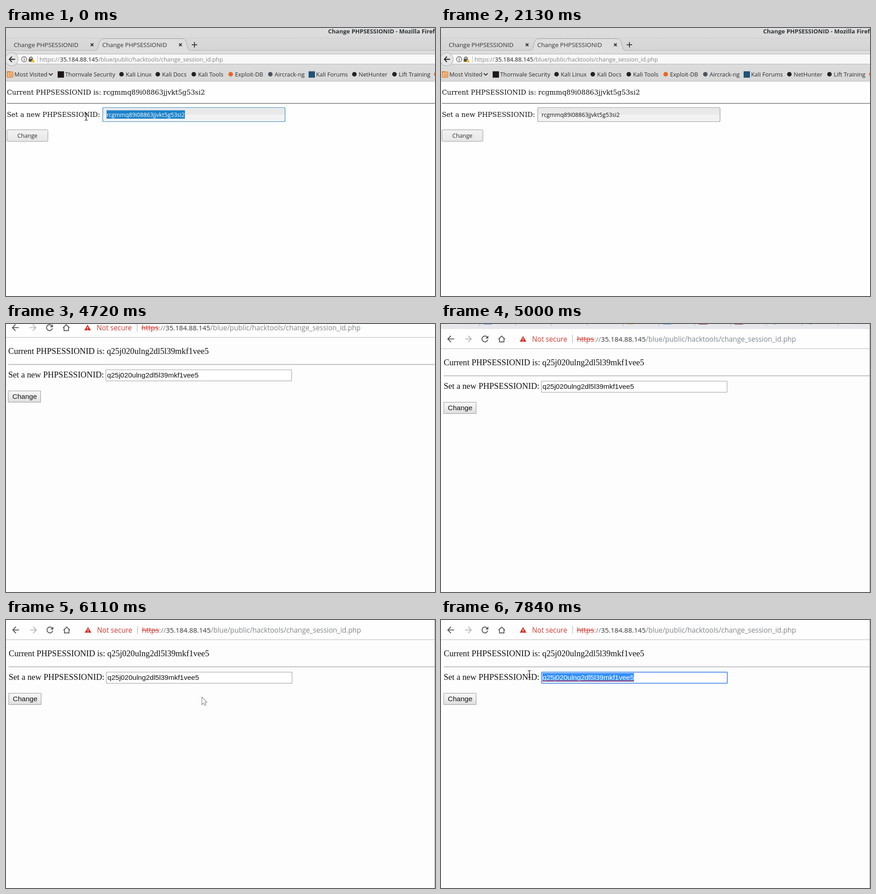
These frames come from a looping animation (947 px wide and 591 px high, 8000 ms). An HTML page with a canvas:

```html
<!DOCTYPE html>
<html lang="en">
<head>
<meta charset="utf-8">
<title>Session change</title>
<style>
html, body { margin: 0; width: 100%; height: 100%; overflow: hidden; background: #fff; }
canvas { display: block; width: 947px; height: 591px; }
</style>
</head>
<body>
<canvas id="stage" width="947" height="591"></canvas>
<script>
const ctx = document.getElementById('stage').getContext('2d');
const LOOP = 8000;
const W = 947, H = 591;
const UI = '"Open Sans", "Noto Sans", sans-serif';
const SERIF = '"DejaVu Serif", serif';
const TIMES = '"Liberation Serif", serif';
const ARIAL = '"Liberation Sans", sans-serif';
const OLD_ID = 'rcgmmq89i08863jjvkt5g53si2';
const NEW_ID = 'q25j020ulng2dl5l39mkf1vee5';
const HOST = '35.184.88.145';
const PATH = '/blue/public/hacktools/change_session_id.php';

// [time, shape, x, y]; arrows are placed by the tip, beams by the centre
const POINTER = [
  [0, 'beam', 177, 196], [150, 'beam', 186, 194], [270, 'beam', 199, 190],
  [390, 'beam', 211, 187], [540, 'arrow', 370, 96], [660, 'arrow', 495, 27],
  [810, 'arrow', 509, 24], [960, 'arrow', 440, 36], [1080, 'beam', 320, 66],
  [1200, 'beam', 246, 75], [1350, 'arrow', 372, 122], [1470, 'arrow', 480, 168],
  [1740, 'arrow', 489, 171], [1990, 'arrow', 585, 171], [2130, 'none', 0, 0],
  [5420, 'arrow', 932, 46], [5570, 'arrow', 700, 118], [5690, 'arrow', 473, 190],
  [5840, 'arrow', 390, 142], [5960, 'arrow', 311, 97], [6110, 'arrow', 432, 170],
  [6240, 'arrow', 461, 83], [6380, 'arrow', 374, 86], [6630, 'arrow', 382, 101],
  [6780, 'arrow', 402, 108], [6900, 'beam', 424, 126], [7020, 'beam', 438, 131],
  [7170, 'beam', 440, 130], [7300, 'beam', 440, 129], [7450, 'beam', 372, 125],
  [7580, 'beam', 282, 119], [7700, 'beam', 198, 115], [7840, 'beam', 195, 119]
];

// [time, x, y] of the second page while the view pans
const PAN = [[3000, -3, -56], [4720, -1, -25], [4870, 0, -10], [5000, 0, 0], [5140, 0, -11]];

// [time, left edge of the selected text]
const DRAG = [[0, 426], [7450, 372], [7580, 282], [7700, 224]];

const at = (keys, t) => keys.reduce((found, key) => key[0] <= t ? key : found, keys[0]);

function text(str, x, y, size, family, color = '#000', weight = 400) {
  ctx.font = `${weight} ${size}px ${family}`;
  ctx.fillStyle = color;
  ctx.fillText(str, x, y);
}

function box(x, y, w, h, color) {
  ctx.fillStyle = color;
  ctx.fillRect(x, y, w, h);
}

function dot(x, y, r, color) {
  ctx.fillStyle = color;
  ctx.beginPath();
  ctx.arc(x, y, r, 0, 7);
  ctx.fill();
}

function line(points, color, width = 1, close = false) {
  ctx.beginPath();
  points.forEach(([x, y]) => ctx.lineTo(x, y));
  if (close) ctx.closePath();
  ctx.strokeStyle = color;
  ctx.lineWidth = width;
  ctx.stroke();
}

function fade(y, h, ...colors) {
  const g = ctx.createLinearGradient(0, y, 0, y + h);
  colors.forEach((c, i) => g.addColorStop(i / (colors.length - 1), c));
  return g;
}

function panel(x, y, w, h, r, fill, stroke, width = 1) {
  ctx.beginPath();
  ctx.roundRect(x, y, w, h, r);
  ctx.fillStyle = fill;
  ctx.fill();
  ctx.strokeStyle = stroke;
  ctx.lineWidth = width;
  ctx.stroke();
}

function drawPointer(t) {
  const [, shape, x, y] = at(POINTER, t);
  if (shape === 'none') return;
  ctx.save();
  ctx.translate(x, y);
  if (shape === 'arrow') {
    const tip = [[.5, .5], [.5, 16], [4, 12.7], [6.6, 18.3], [9, 17.2], [6.5, 11.8], [11, 11.5]];
    line(tip, '#222', 1.2, true);
    ctx.fillStyle = '#fff';
    ctx.fill();
  } else {
    line([[0, -7], [0, 7]], '#222', 1.3);
    for (const end of [-1, 1]) line([[-3.5, 7.5 * end], [-1, 7.5 * end], [0, 6 * end], [1, 7.5 * end], [3.5, 7.5 * end]], '#222', 1.1);
  }
  ctx.restore();
}

function cross(x, y) {
  line([[x - 3, y - 3], [x + 3, y + 3]], '#333', 2);
  line([[x + 3, y - 3], [x - 3, y + 3]], '#333', 2);
}

function drawTabs() {
  box(0, 0, W, 50, fade(0, 50, '#dedede', '#d5d5d5'));
  text('Change PHPSESSIONID - Mozilla Firefox', 711, 12, 13, UI, '#2e3436', 700);
  line([[0, 22.5], [W, 22.5]], '#cdcdcd');
  line([[0, 49.5], [W, 49.5]], '#b2b2b2');
  ctx.beginPath();
  ctx.moveTo(197, 50);
  ctx.bezierCurveTo(207, 48, 201, 24, 216, 23.5);
  ctx.lineTo(388, 23.5);
  ctx.bezierCurveTo(403, 24, 397, 48, 407, 50);
  ctx.fillStyle = '#dedede';
  ctx.fill();
  ctx.strokeStyle = '#a2a2a2';
  ctx.lineWidth = 1;
  ctx.stroke();
  for (const x of [17, 212.5]) text('Change PHPSESSIONID', x, 42, 13.3, UI, '#333');
  cross(190, 37);
  cross(385, 37);
  line([[410, 37], [422, 37]], '#333', 1.8);
  line([[416, 31], [416, 43]], '#333', 1.8);
}

function drawAddress() {
  box(0, 50, W, 68, fade(50, 68, '#dedede', '#d9d9d9'));
  panel(12, 57.5, W, 22, 0, '#f8f8f8', '#b3b3b3');
  ctx.beginPath();
  ctx.arc(12.5, 69, 14.5, 0, 7);
  ctx.fillStyle = '#e6e6e6';
  ctx.fill();
  ctx.strokeStyle = '#a5a5a5';
  ctx.stroke();
  line([[13, 63], [7.5, 69], [13, 75]], '#333', 2.4);
  line([[8, 69], [20, 69]], '#333', 2.4);

  ctx.beginPath();
  ctx.arc(40, 69, 5.8, 0, 7);
  ctx.strokeStyle = '#555';
  ctx.lineWidth = 1.2;
  ctx.stroke();
  box(39.3, 68, 1.5, 4.5, '#555');
  box(39.3, 65.2, 1.5, 1.6, '#555');

  ctx.beginPath();
  ctx.arc(55, 67, 3, Math.PI, 0);
  ctx.strokeStyle = '#555';
  ctx.lineWidth = 1.7;
  ctx.stroke();
  box(50, 67.5, 10, 7, '#555');
  line([[59, 68.5], [55.5, 75], [62.8, 75]], '#e5a400', 1, true);
  ctx.fillStyle = '#f6bd18';
  ctx.fill();

  line([[69.5, 62], [69.5, 76]], '#bbb');
  text('https://', 74, 73.5, 13, UI, '#858585');
  text(HOST, 119, 73.5, 13, UI, '#222');
  text(PATH, 204, 73.5, 12.8, UI, '#858585');
}

function drawBookmarks() {
  panel(2.7, 97, 12.5, 11.5, 1, '#f4c69a', '#d9741c', 1.4);
  box(2, 95.5, 6, 2.5, '#d9741c');
  dot(9.5, 103, 3, '#d9741c');
  dot(9.5, 103, 1.4, '#fff');
  line([[94.5, 100], [98.7, 104.2], [103, 100]], '#333', 2);
  const marks = [
    ['Most Visited', 18.5], ['Thornvale Security', 130.5, '#1d1718', 'square'],
    ['Kali Linux', 264.5, '#222'], ['Kali Docs', 344.5, '#222'],
    ['Kali Tools', 424, '#222'], ['Exploit-DB', 505.5, '#ee6420'],
    ['Aircrack-ng', 593, '#4b555e'], ['Kali Forums', 684.5, '#205273', 'square'],
    ['NetHunter', 778.5, '#222'], ['Lift Training', 867, '#222']
  ];
  for (const [name, x, color, shape] of marks) {
    text(name, x, 107, 12.8, UI, '#2b2b2b');
    if (shape) box(x - 16.5, 95.5, 14, 14, color);
    else if (color) dot(x - 9.5, 102, 5, color);
  }
  dot(951, 102, 6, '#ee6420');
  line([[0, 117.5], [W, 117.5]], '#bdbdbd');
}

function drawFirst(t) {
  const focused = t < 1620;
  box(0, 0, W, H, '#fefefe');
  drawTabs();
  drawAddress();
  drawBookmarks();
  text('Current PHPSESSIONID is: ' + OLD_ID, 2, 147, 14.77, SERIF, '#111');
  box(2, 165.5, W, 1.6, '#7d7d7d');
  text('Set a new PHPSESSIONID:', 2, 195.5, 14.77, SERIF, '#111');
  panel(213.5, 175.5, 402.5, 31, 3, '#f2f2f2', focused ? '#3287bd' : '#999', 1.2);
  box(215, 177, 400, 14, '#e9e9e9');
  if (focused) box(222, 181.5, 173, 18.5, '#1c82ca');
  text(OLD_ID, 222, 195.5, 12.7, UI, focused ? '#fff' : '#111');
  panel(2, 224.5, 90.5, 25.5, 2, fade(224, 26, '#f2f2f2', '#e7e7e7'), '#999');
  text('Change', 25, 242, 12.6, UI, '#2e2e2e');
}

function drawStrip() {
  box(0, -30, W, 41, '#e5e7ea');
  for (let i = 0; i < 11; i++) box(85 + i * 79.1, -8, 1, 12, '#a9acb0');
  const icons = [
    [18, 14, '#fafafa'], [94, 18, '#4285f4'], [411, 14, '#f0b72c'], [490, 18, '#4285f4'],
    [569, 19, '#8b1a3c'], [648, 19, '#8b1a3c'], [735, 3, '#4a6fc4'], [814, 3, '#4a6fc4'],
    [884, 20, '#fafafa']
  ];
  for (const [x, w, color] of icons) box(x, -w + 1, w, w, color);
}

function drawToolbar() {
  box(-5, 11, W + 10, 43, '#fefefe');
  box(-5, 54, W + 10, 1, '#b9b9b9');
  const arrow = (x, dir, color) => {
    line([[x - 7 * dir, 33], [x + 7 * dir, 33]], color, 1.8);
    line([[x, 26], [x - 7 * dir, 33], [x, 40]], color, 1.8);
  };
  arrow(22, 1, '#555');
  arrow(60, -1, '#b8b8b8');

  ctx.beginPath();
  ctx.arc(97, 33, 6.5, .25, 5.5);
  ctx.strokeStyle = '#555';
  ctx.lineWidth = 1.9;
  ctx.stroke();
  ctx.beginPath();
  [[104.5, 25.5], [104.5, 32], [98, 32]].forEach(p => ctx.lineTo(...p));
  ctx.fillStyle = '#555';
  ctx.fill();

  line([[127, 33.5], [134, 26.5], [141, 33.5]], '#555', 1.8);
  line([[129, 32], [129, 39.5], [139, 39.5], [139, 32]], '#555', 1.8);

  ctx.beginPath();
  [[181, 26.5], [174, 39], [188.5, 39]].forEach(p => ctx.lineTo(...p));
  ctx.fillStyle = '#d32f24';
  ctx.fill();
  box(180.4, 31, 1.5, 4, '#fff');
  box(180.4, 36, 1.5, 1.5, '#fff');

  text('Not secure', 201, 38.5, 15.4, UI, '#d23b31');
  box(290, 24, 1, 18, '#aaa');
  text('https', 300, 38.5, 15.6, UI, '#d23b31');
  box(300, 33, 38, 1.3, '#d23b31');
  text('://', 338, 38.5, 15, UI, '#777');
  text(HOST, 353, 38.5, 15.2, UI, '#333');
  text(PATH, 452, 38.5, 15.45, UI, '#80868b');
}

function drawField(t) {
  const focused = t >= 7170;
  const value = color => text(NEW_ID, 224, 143, 15.54, ARIAL, color);
  if (focused) panel(222, 126, 410, 24.5, 1, '#fff', '#5b93ee', 2);
  else panel(221.5, 126, 410, 24.5, 0, '#fff', '#999');
  value('#111');
  if (!focused) return;
  const left = at(DRAG, t)[1];
  if (left < 426) {
    ctx.save();
    ctx.beginPath();
    ctx.rect(left, 128, 426 - left, 19);
    ctx.clip();
    box(left, 128, 426 - left, 19, '#3390fb');
    value('#fff');
    ctx.restore();
  } else {
    box(426, 129, 1, 17, '#111');
  }
  const wave = [];
  for (let x = 224; x <= 426; x += 2) wave.push([x, 145.5 + (x % 4 ? .8 : -.8)]);
  line(wave, '#e0303c', 1.1);
}

function drawSecond(t) {
  const [, x, y] = at(PAN, t);
  box(0, 0, W, H, '#fdfdfd');
  ctx.save();
  ctx.translate(x, y);
  drawStrip();
  drawToolbar();
  text('Current PHPSESSIONID is: ' + NEW_ID, 6, 91, 18.6, TIMES, '#111');
  box(6, 113.5, W, 1.2, '#999');
  box(6, 114.7, W, 1, '#e4e4e4');
  text('Set a new PHPSESSIONID:', 6, 143, 18.6, TIMES, '#111');
  drawField(t);
  panel(6, 172.5, 71.5, 25, 0, fade(172, 26, '#f7f7f7', '#eee', '#dcdcdc'), '#999');
  text('Change', 15, 190, 15.5, ARIAL, '#111');
  ctx.restore();
  if (t >= 5000) box(946, 0, 1, H, '#9a9a9a');
}

function draw(now) {
  const t = now % LOOP;
  if (t < 3000) drawFirst(t);
  else drawSecond(t);
  drawPointer(t);
}

const start = performance.now();
function tick() {
  draw(performance.now() - start);
  requestAnimationFrame(tick);
}
tick();
</script>
</body>
</html>
```
